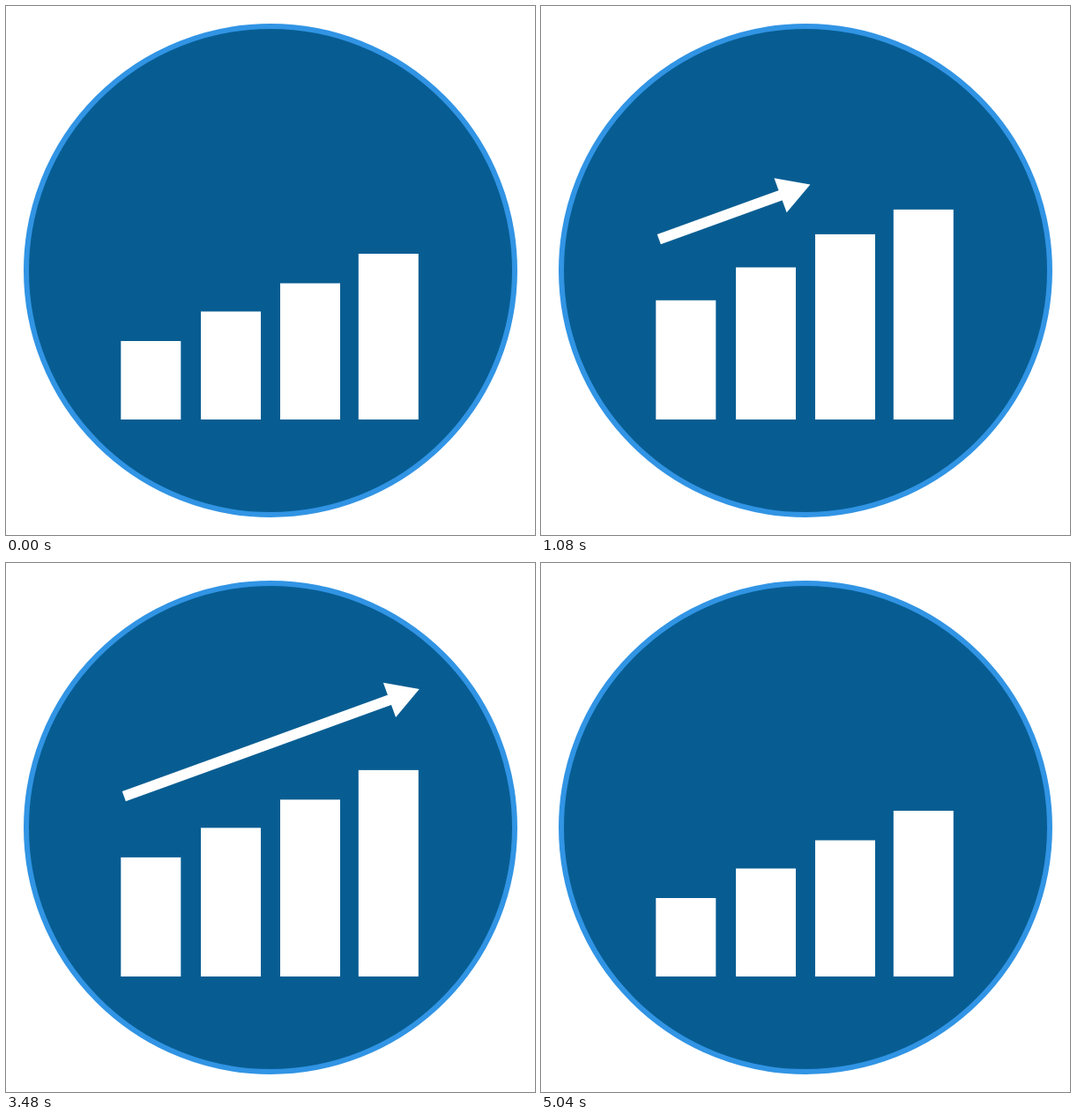
Write an HTML page that moves like this. It is 600 px wide and 600 px high and loops after 5080 ms.

```html
<!DOCTYPE html>
<html lang="en">
<head>
<meta charset="utf-8">
<title>Growth chart</title>
<style>
  html, body { margin: 0; width: 100%; height: 100%; overflow: hidden; background: #fff; }
  svg { display: block; width: 100%; height: 100%; }
</style>
</head>
<body>
<svg viewBox="0 0 600 600">
  <circle cx="300" cy="300" r="277" fill="#075d92" stroke="#3194e4" stroke-width="6"/>
  <g id="bars" fill="#fff"></g>
  <g fill="#fff" transform="translate(133.8 264.7) rotate(-19.95)">
    <rect id="shaft" y="-6" height="12"/>
    <path id="head" d="M0-20.8 36 0 0 20.8Z"/>
  </g>
</svg>
<script>
const LOOP = 5080, STEP = 40, BASE = 469, RISE = 46.2, OVER = 10, SHAFT = 320.4;

// x, resting top, time of the highest point, time it has settled
const bars = [
  [130.3, 380, 760, 1080],
  [221, 346.5, 860, 1240],
  [311, 314.5, 1150, 1600],
  [399.8, 281, 840, 1260]
].map(([x, top, peak, settle]) => {
  const el = document.createElementNS("http://www.w3.org/2000/svg", "rect");
  el.setAttribute("x", x);
  el.setAttribute("width", 68);
  document.getElementById("bars").append(el);
  return { el, top, peak, settle };
});
const shaft = document.getElementById("shaft");
const head = document.getElementById("head");

// smooth progress from 0 to 1 between times a and b
function ease(t, a, b) {
  const u = Math.min(1, Math.max(0, (t - a) / (b - a)));
  return u * u * (3 - 2 * u);
}

function draw(t) {
  for (const { el, top, peak, settle } of bars) {
    const lift = (RISE + OVER) * ease(t, 0, peak)
      - OVER * ease(t, peak, settle)
      - RISE * ease(t, 3440, 5040);
    el.setAttribute("y", top - lift);
    el.setAttribute("height", BASE - top + lift);
  }
  const tail = SHAFT * ease(t, 3580, 5040);
  const front = SHAFT * ease(t, 250, 2010);
  const size = ease(t, 250, 400) - ease(t, 4900, 5040);
  shaft.setAttribute("x", tail);
  shaft.setAttribute("width", Math.max(0, front - tail) + (size > 0 ? 0.5 : 0));
  head.setAttribute("transform", `translate(${front}) scale(${size})`);
}

let start;
function tick(now) {
  start ??= now;
  draw(Math.floor((now - start) % LOOP / STEP) * STEP);
  requestAnimationFrame(tick);
}
draw(0);
requestAnimationFrame(tick);
</script>
</body>
</html>
```
